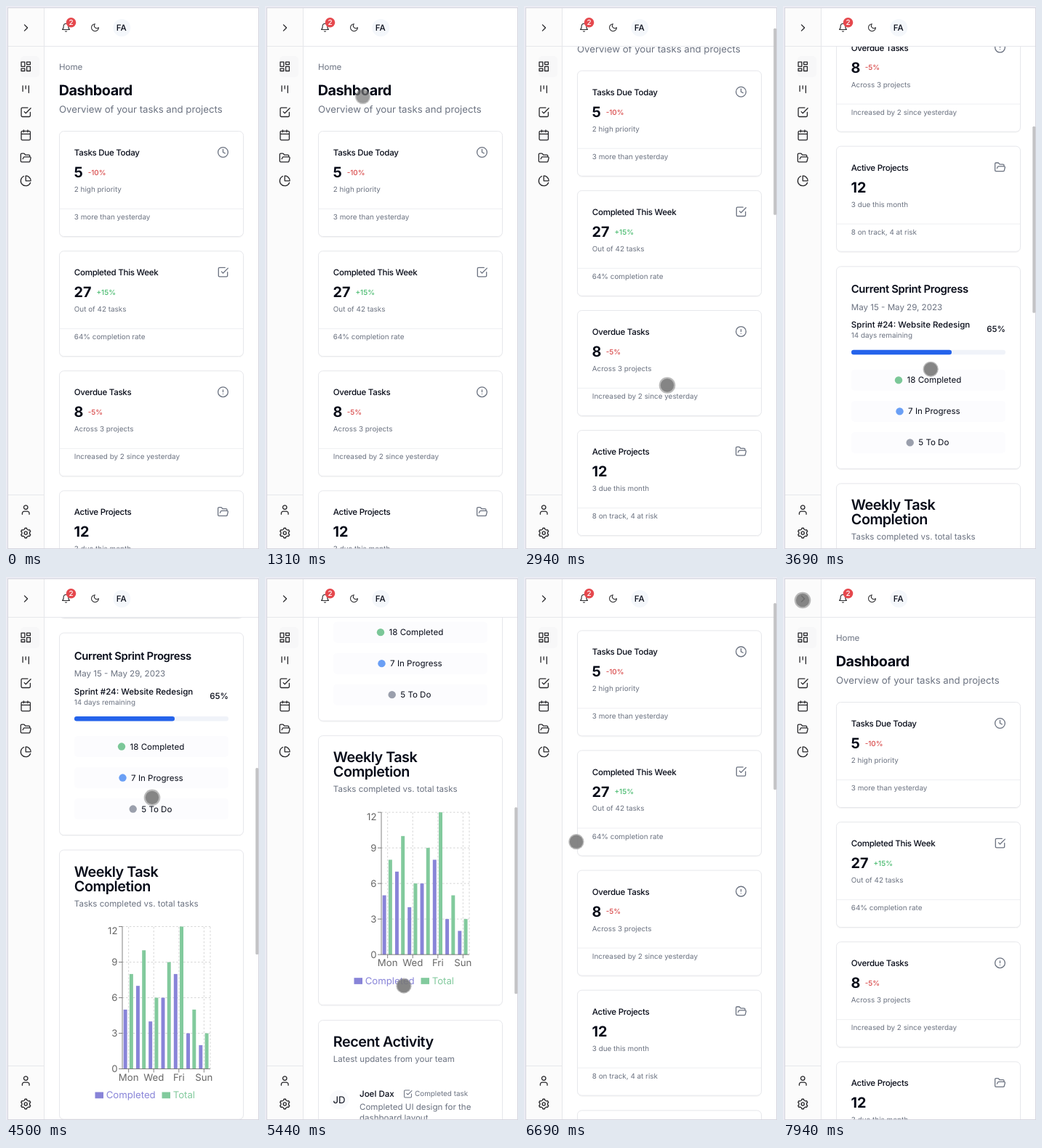
Write an HTML page that moves like this. It is 348x748 px and loops after 8000 ms.

```html
<!DOCTYPE html>
<html lang="en">
<head>
<meta charset="utf-8">
<title>Dashboard</title>
<style>
html, body { margin: 0; width: 100%; height: 100%; overflow: hidden; background: #ebebf3; }
svg { display: block; width: 348px; height: 748px; font-family: Inter, "Liberation Sans", sans-serif; }
text { text-rendering: geometricPrecision; }
</style>
</head>
<body>
<svg id="stage" viewBox="0 0 348 748" xmlns="http://www.w3.org/2000/svg">
  <defs>
    <clipPath id="view"><rect x="53" y="56" width="294" height="691"/></clipPath>
    <filter id="shade" x="-5%" y="-5%" width="110%" height="112%">
      <feDropShadow dx="0" dy="0.8" stdDeviation="0.7" flood-color="#000" flood-opacity="0.06"/>
    </filter>
  </defs>
  <rect x="2.5" y="2.5" width="345" height="745" fill="#fff" stroke="#d6d6df"/>
  <g clip-path="url(#view)"><g id="page"></g></g>
  <g id="frame"></g>
  <rect id="thumb" x="343.3" width="3.9" height="257" rx="1.5" fill="#c3c3c5"/>
  <g id="pointer">
    <circle id="ring" r="11.3" fill="#8c8c8c" fill-opacity="0.6"/>
    <circle id="dot" r="9.2" fill="#6f6f6f" fill-opacity="0.7"/>
  </g>
</svg>
<script>
const LOOP = 8000;
const ZOOM = 0.825;
const INK = '#070b18', MUTED = '#6b7280', LINE = '#e6e7eb';
const SMALL = 12 * ZOOM, BODY = 14 * ZOOM, LARGE = 16 * ZOOM, TITLE = 18 * ZOOM, HEAD = 24 * ZOOM;
const ICON = 20 * ZOOM, ICON_SMALL = 16 * ZOOM;
const $ = id => document.getElementById(id);
const page = $('page'), frame = $('frame');

function add(parent, tag, attrs, text) {
  const node = document.createElementNS('http://www.w3.org/2000/svg', tag);
  for (const key in attrs) node.setAttribute(key, attrs[key]);
  if (text !== undefined) node.textContent = text;
  parent.appendChild(node);
  return node;
}

const box = (parent, x, y, width, height, fill, rx = 0) =>
  add(parent, 'rect', { x, y, width, height, fill, rx });
const disc = (parent, cx, cy, r, fill) => add(parent, 'circle', { cx, cy, r, fill });
const stroke = (parent, d, color, extra) =>
  add(parent, 'path', { d, stroke: color, fill: 'none', ...extra });

function label(parent, x, y, text, size, { fill = INK, weight = 400, tight = false, anchor = 'start' } = {}) {
  add(parent, 'text', {
    x, y, fill, 'font-size': size, 'font-weight': weight, 'text-anchor': anchor,
    'letter-spacing': tight ? -0.025 * size : 0
  }, text);
}

const ring = (x, y, r) => `M${x - r} ${y}a${r} ${r} 0 1 0 ${2 * r} 0a${r} ${r} 0 1 0 ${-2 * r} 0`;
const tile = (x, y, w, h) => `M${x} ${y}h${w}v${h}h${-w}z`;
const ICONS = {
  next: 'm9 18 6-6-6-6',
  board: tile(3, 3, 7, 9) + tile(14, 3, 7, 5) + tile(14, 12, 7, 9) + tile(3, 16, 7, 5),
  kanban: 'M6 5v11M12 5v6M18 5v14',
  check: 'm9 11 3 3L22 4M21 12v7a2 2 0 0 1-2 2H5a2 2 0 0 1-2-2V5a2 2 0 0 1 2-2h11',
  calendar: 'M5 4h14a2 2 0 0 1 2 2v14a2 2 0 0 1-2 2H5a2 2 0 0 1-2-2V6a2 2 0 0 1 2-2zM16 2v4M8 2v4M3 10h18',
  folder: 'm6 14 1.5-2.9A2 2 0 0 1 9.24 10H20a2 2 0 0 1 1.94 2.5l-1.54 6a2 2 0 0 1-1.95 1.5H4a2 2 0 0 1-2-2V5a2 2 0 0 1 2-2h3.9a2 2 0 0 1 1.69.9l.81 1.2a2 2 0 0 0 1.67.9H18a2 2 0 0 1 2 2v2',
  pie: 'M21.21 15.89A10 10 0 1 1 8 2.83M22 12A10 10 0 0 0 12 2v10z',
  user: 'M19 21v-2a4 4 0 0 0-4-4H9a4 4 0 0 0-4 4v2' + ring(12, 7, 4),
  bell: 'M6 8a6 6 0 0 1 12 0c0 7 3 9 3 9H3s3-2 3-9M10.3 21a1.94 1.94 0 0 0 3.4 0',
  moon: 'M12 3a6 6 0 0 0 9 9 9 9 0 1 1-9-9Z',
  clock: ring(12, 12, 10) + 'M12 6v6l4 2',
  alert: ring(12, 12, 10) + 'M12 8v4M12 16h.01',
  gear: gearPath() + ring(12, 12, 3)
};

// Six rounded teeth around the hub.
function gearPath() {
  const points = [];
  for (let i = 0; i < 6; i++) {
    for (const [turn, r] of [[-0.29, 8], [-0.17, 10], [0.17, 10], [0.29, 8]]) {
      const a = (i + turn) * Math.PI / 3 - Math.PI / 2;
      points.push(`${(12 + r * Math.cos(a)).toFixed(2)} ${(12 + r * Math.sin(a)).toFixed(2)}`);
    }
  }
  return `M${points.join('L')}Z`;
}

function icon(parent, name, cx, cy, color, size = ICON) {
  stroke(parent, ICONS[name], color, {
    'stroke-width': 1.9, 'stroke-linecap': 'round', 'stroke-linejoin': 'round',
    transform: `translate(${cx} ${cy}) scale(${size / 24}) translate(-12 -12)`
  });
}

function card(y, height) {
  add(page, 'rect', {
    x: 73.5, y, width: 253, height, rx: 6, fill: '#fff', stroke: LINE, filter: 'url(#shade)'
  });
}

function statCard(i, { title, value, change, tone, gap, note, foot, art }) {
  const y = 172.5 + 165.1 * i;
  card(y, 145);
  label(page, 93.8, y + 33.6, title, BODY, { weight: 500, tight: true });
  icon(page, art, 298.5, y + 29, MUTED);
  label(page, 93.5, y + 63.6, value, HEAD, { weight: 700 });
  if (change) label(page, gap, y + 60.3, change, SMALL, { fill: tone, weight: 500 });
  label(page, 93.8, y + 83.5, note, SMALL, { fill: MUTED });
  stroke(page, `M74 ${y + 107}H326`, '#eeeff2');
  label(page, 93.8, y + 121.6, foot, SMALL, { fill: MUTED });
}

function drawStats() {
  const red = '#d84848', green = '#45b96c';
  label(page, 73, 88, 'Home', BODY, { fill: MUTED });
  label(page, 72.7, 123, 'Dashboard', HEAD, { weight: 700, tight: true });
  label(page, 73, 147, 'Overview of your tasks and projects', LARGE, { fill: MUTED });
  [
    { title: 'Tasks Due Today', value: '5', change: '-10%', tone: red, gap: 112.7,
      note: '2 high priority', foot: '3 more than yesterday', art: 'clock' },
    { title: 'Completed This Week', value: '27', change: '+15%', tone: green, gap: 124.5,
      note: 'Out of 42 tasks', foot: '64% completion rate', art: 'check' },
    { title: 'Overdue Tasks', value: '8', change: '-5%', tone: red, gap: 112.7,
      note: 'Across 3 projects', foot: 'Increased by 2 since yesterday', art: 'alert' },
    { title: 'Active Projects', value: '12',
      note: '3 due this month', foot: '8 on track, 4 at risk', art: 'folder' }
  ].forEach((stat, i) => statCard(i, stat));
}

function drawSprint() {
  card(833.5, 278.5);
  label(page, 93.8, 870, 'Current Sprint Progress', TITLE, { weight: 600, tight: true });
  label(page, 93.8, 893.7, 'May 15 - May 29, 2023', BODY, { fill: MUTED });
  label(page, 93.8, 918, 'Sprint #24: Website Redesign', BODY, { weight: 500 });
  label(page, 93.8, 932, '14 days remaining', SMALL, { fill: MUTED });
  label(page, 306, 924, '65%', BODY, { weight: 500, anchor: 'end' });
  box(page, 94, 948.4, 212, 6.5, '#f0f3f9', 3.2);
  box(page, 94, 948.4, 138, 6.5, '#2563eb', 3.2);
  [
    ['18 Completed', 159, '#7bc798'],
    ['7 In Progress', 160.5, '#6a9ff5'],
    ['5 To Do', 174.7, '#9a9fac']
  ].forEach(([text, x, tone], i) => {
    const y = 990 + 43 * i;
    box(page, 94, y - 14.5, 212, 29, '#fcfcfe', 5);
    disc(page, x, y, 5.2, tone);
    label(page, x + 11.6, y + 4.1, text, BODY);
  });
}

function drawChart() {
  const done = [5, 7, 4, 6, 8, 3, 2], total = [8, 10, 6, 9, 12, 5, 3];
  const days = ['Mon', 'Wed', 'Fri', 'Sun'];
  const left = 160, right = 281, base = 1434, unit = 196 / 12, band = (right - left) / 7;
  const bar = 6 * ZOOM, inset = 2 * ZOOM, step = 10 * ZOOM;
  const purple = '#8884d8', green = '#82ca9d', axis = '#666';
  const mid = i => left + band * (2 * i + 0.5);

  card(1132.5, 371);
  label(page, 93.8, 1169, 'Weekly Task', HEAD, { weight: 600, tight: true });
  label(page, 93.8, 1189, 'Completion', HEAD, { weight: 600, tight: true });
  label(page, 93.8, 1210, 'Tasks completed vs. total tasks', BODY, { fill: MUTED });

  let grid = `M${right} ${base}V1238`;
  for (let v = 3; v <= 12; v += 3) grid += `M${left} ${base - v * unit}H${right}`;
  days.forEach((_, i) => grid += `M${mid(i)} ${base}V1238`);
  stroke(page, grid, '#ccc', { 'stroke-dasharray': 3 * ZOOM, 'stroke-width': ZOOM });

  done.forEach((v, i) => {
    const x = left + band * i + inset;
    box(page, x, base - v * unit, bar, v * unit, purple);
    box(page, x + step, base - total[i] * unit, bar, total[i] * unit, green);
  });

  let lines = `M${left} 1238V${base}H${right}`;
  for (let v = 0; v <= 12; v += 3) {
    const y = base - v * unit;
    lines += `M${left - 5} ${y}h5`;
    label(page, 153.5, y + (v === 12 ? 10.5 : 4.7), v, LARGE, { fill: axis, anchor: 'end' });
  }
  days.forEach((day, i) => {
    lines += `M${mid(i)} ${base}v5`;
    label(page, mid(i), 1450, day, LARGE, { fill: axis, anchor: 'middle' });
  });
  stroke(page, lines, axis, { 'stroke-width': ZOOM });

  box(page, 122.5, 1466, 11.5, 8.7, purple);
  label(page, 137.7, 1474.5, 'Completed', LARGE, { fill: purple });
  box(page, 214.5, 1466, 11.5, 8.7, green);
  label(page, 229.7, 1474.5, 'Total', LARGE, { fill: green });
}

function drawActivity() {
  card(1524.5, 600);
  label(page, 93.8, 1561, 'Recent Activity', HEAD, { weight: 600, tight: true });
  label(page, 93.8, 1582, 'Latest updates from your team', BODY, { fill: MUTED });
  disc(page, 102, 1634, 13.2, '#f9fafc');
  label(page, 102, 1638.8, 'JD', LARGE, { anchor: 'middle' });
  label(page, 130, 1630, 'Joel Dax', BODY, { weight: 500 });
  icon(page, 'check', 196.5, 1625.8, MUTED, ICON_SMALL);
  label(page, 206, 1629.3, 'Completed task', SMALL, { fill: MUTED });
  label(page, 130, 1648, 'Completed UI design for the', BODY, { fill: MUTED });
  label(page, 130, 1662.6, 'dashboard layout', BODY, { fill: MUTED });
}

function drawFrame() {
  const dark = '#27272a';
  box(frame, 3, 3, 49, 744, '#fbfbfb');
  stroke(frame, 'M52.5 3V747M3 55.5H347M3 673.5H52', LINE);
  box(frame, 20, 69, 26, 29, '#f7f7f8', 5);
  icon(frame, 'next', 27.5, 30, dark);
  ['board', 'kanban', 'check', 'calendar', 'folder', 'pie'].forEach((name, i) =>
    icon(frame, name, 27.2, 83.3 + 31.5 * i, dark));
  icon(frame, 'user', 27.2, 694, dark);
  icon(frame, 'gear', 27.2, 726, dark);

  icon(frame, 'bell', 82.5, 29.7, dark, ICON_SMALL);
  disc(frame, 89.5, 22.7, 6.8, '#e5484d');
  label(frame, 89.5, 26.2, '2', SMALL, { fill: '#fff', weight: 500, anchor: 'middle' });
  icon(frame, 'moon', 122.5, 29.7, dark, ICON_SMALL);
  disc(frame, 159.3, 30, 12, '#f4f7fb');
  label(frame, 158.8, 34.2, 'FA', BODY, { weight: 500, anchor: 'middle' });
}

// Smooth curve through [time, value] points that never overshoots.
function track(points) {
  const slope = i => (points[i + 1][1] - points[i][1]) / (points[i + 1][0] - points[i][0]);
  const tangents = points.map((_, i) => {
    if (i === 0 || i === points.length - 1) return 0;
    const a = slope(i - 1), b = slope(i);
    return a * b <= 0 ? 0 : 2 * a * b / (a + b);
  });
  return t => {
    if (t <= points[0][0]) return points[0][1];
    const i = points.findIndex(p => p[0] > t) - 1;
    if (i < 0) return points[points.length - 1][1];
    const [t0, v0] = points[i], [t1, v1] = points[i + 1];
    const d = t1 - t0, u = (t - t0) / d, w = 1 - u;
    return v0 * (1 + 2 * u) * w * w + v1 * u * u * (3 - 2 * u)
      + d * u * w * (tangents[i] * w - tangents[i + 1] * u);
  };
}

const scrollAt = track([
  [2420, 0], [2940, 83], [3250, 330], [3750, 490], [4200, 590], [4500, 756],
  [4950, 925], [5200, 935], [5440, 914], [6000, 460], [6690, 99], [7000, 0]
]);
const path = [
  [1240, 133, 119], [1310, 134.5, 124.5], [1680, 190, 600], [2700, 198, 600], [2940, 197, 523],
  [3250, 200, 300], [3950, 204, 590], [4500, 201, 304], [4950, 197, 270], [5440, 191, 563],
  [5950, 165, 600], [6690, 72, 365], [7690, 27, 32]
];
const xAt = track(path.map(p => [p[0], p[1]]));
const yAt = track(path.map(p => [p[0], p[2]]));
const presses = [[2650, 3250], [4050, 4550], [5050, 5400], [7860, LOOP]];
const fade = (t, from, to) => Math.min(1, Math.max(0, (t - from) / (to - from)));

function render(t) {
  const scroll = scrollAt(t);
  page.setAttribute('transform', `translate(0 ${-scroll})`);
  $('thumb').setAttribute('y', 2 + scroll * 0.345);
  $('thumb').setAttribute('opacity', fade(t, 2400, 2480) * (1 - fade(t, 7150, 7310)));
  $('pointer').setAttribute('transform', `translate(${xAt(t)} ${yAt(t)})`);
  $('pointer').setAttribute('opacity', fade(t, 1230, 1330));
  const pressed = presses.some(([from, to]) => t >= from && t < to);
  $('ring').setAttribute('r', pressed ? 11.3 : 10.6);
}

drawStats();
drawSprint();
drawChart();
drawActivity();
drawFrame();

function tick() {
  render(performance.now() % LOOP);
  requestAnimationFrame(tick);
}
tick();
</script>
</body>
</html>
```
